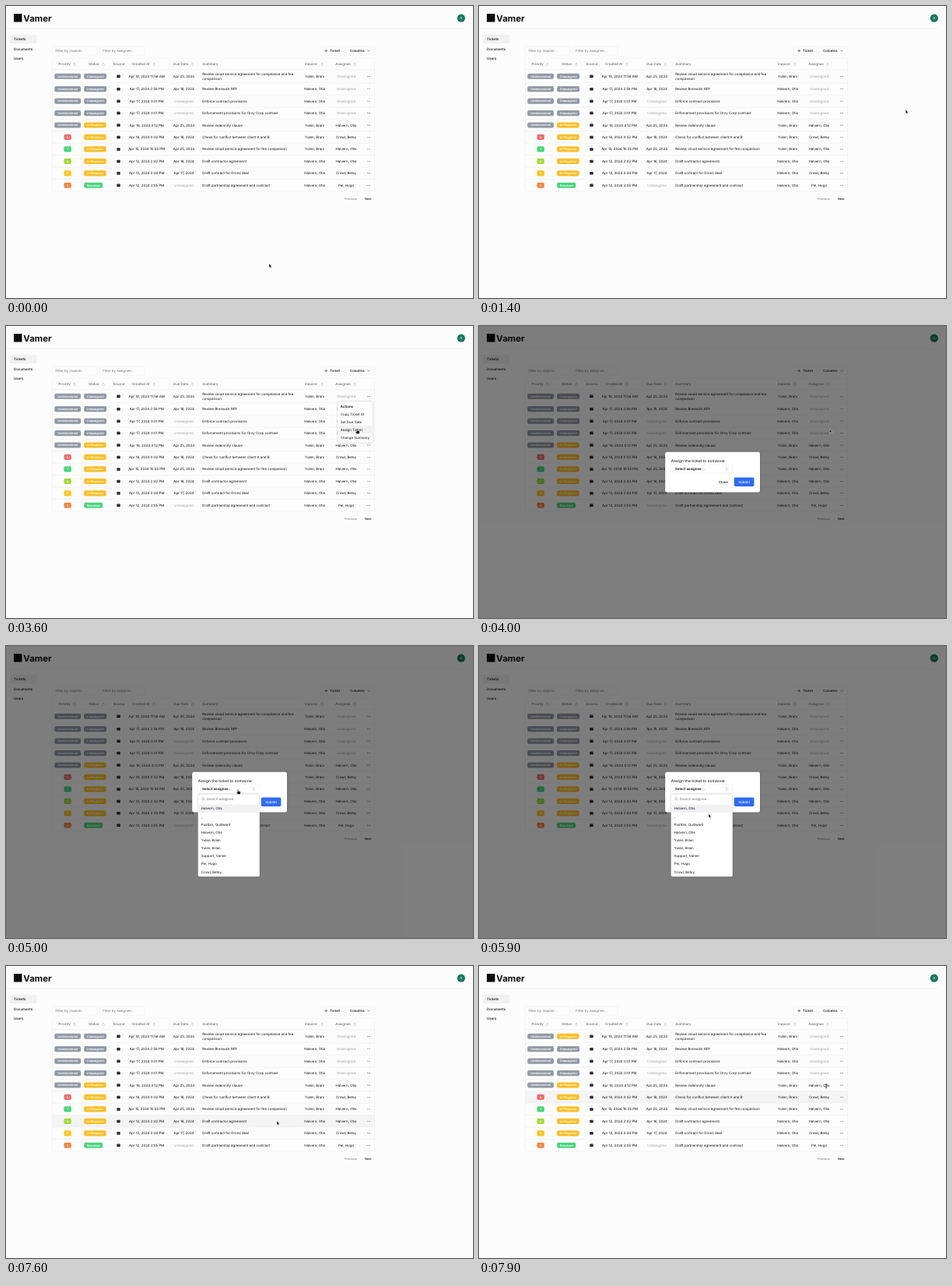
Recreate the animation shown at these times as an HTML page. Size 600 by 375 pixels, loop 8 s.

```html
<!DOCTYPE html>
<html lang="en">
<head>
<meta charset="utf-8">
<title>Tickets</title>
<style>
  html, body { margin: 0; width: 100%; height: 100%; overflow: hidden; background: #fcfcfc; }
  svg { display: block; width: 100%; height: 100%; }
  text { font-family: Inter, sans-serif; text-rendering: geometricPrecision; }
  .raised { filter: drop-shadow(0 .6px 1px #0003); }
</style>
</head>
<body>
<svg id="stage" viewBox="0 0 600 375"></svg>
<script>
const LOOP = 8000, STEP = 100;
const BODY = 4.42, SMALL = 3.79;
const INK = '#0c0c10', MUTED = '#71717a', PALE = '#a0a0a6', LINE = '#e6e6e9', ACCENT = '#f1f1f4';
const OTIS = 'Halvern, Otis', BRAM = 'Yulen, Bram', BETSY = 'Crowl, Betsy', HUGO = 'Pel, Hugo';
const NONE = 'Unassigned', PROGRESS = 'In Progress';

const PRIORITY = { Undetermined: '#9298a4', 5: '#f26b6b', 1: '#45d67c', 2: '#9fdc35', 3: '#f9c51c', 4: '#f3853f' };
const STATUS = { [NONE]: ['#9298a4', 29], [PROGRESS]: ['#fbbf24', 28.5], Resolved: ['#45d67c', 24] };

// priority, status, created, due, summary lines, inquirer, assignee
const TICKETS = [
  ['Undetermined', NONE, 'Apr 19, 2024 11:58 AM', 'Apr 25, 2024', 'Review cloud service agreement for compliance and fee|comparison', BRAM, NONE],
  ['Undetermined', NONE, 'Apr 17, 2024 2:58 PM', 'Apr 18, 2024', 'Review Brenwick RFP', OTIS, NONE],
  ['Undetermined', NONE, 'Apr 17, 2024 0:01 PM', NONE, 'Enforce contract provisions', OTIS, NONE],
  ['Undetermined', NONE, 'Apr 17, 2024 0:01 PM', NONE, 'Enforcement provisions for Orvy Corp contract', OTIS, NONE],
  ['Undetermined', PROGRESS, 'Apr 16, 2024 4:12 PM', 'Apr 25, 2024', 'Review indemnity clause', BRAM, OTIS],
  [5, PROGRESS, 'Apr 16, 2024 0:32 PM', 'Apr 18, 2024', 'Check for conflict between client A and B', BRAM, BETSY],
  [1, PROGRESS, 'Apr 15, 2024 10:35 PM', 'Apr 25, 2024', 'Review cloud service agreement for fee comparison', BRAM, OTIS],
  [2, PROGRESS, 'Apr 12, 2024 2:42 PM', 'Apr 16, 2024', 'Draft contractor agreement', OTIS, OTIS],
  [3, PROGRESS, 'Apr 12, 2024 2:34 PM', 'Apr 17, 2024', 'Draft contract for Dronz deal', OTIS, BETSY],
  [4, 'Resolved', 'Apr 12, 2024 2:05 PM', NONE, 'Draft partnership agreement and contract', OTIS, HUGO],
];
// label, x, x of the sort arrows
const COLUMNS = [['Priority', 67.5, 88], ['Status', 106, 125], ['Source', 137.5], ['Created At', 162, 190],
  ['Due Date', 215, 239.5], ['Summary', 252.3], ['Inquirer', 384, 406], ['Assignee', 423.3, 448]];
const ACTIONS = ['Copy Ticket ID', 'Set Due Date', 'Assign Ticket', 'Change Summary'];
const ASSIGNEES = [OTIS, ',', 'Postbin, Quillward', OTIS, BRAM, BRAM, 'Support, Vamer', HUGO, BETSY];

// Pointer path: time, x, y, shape from then on
const PATH = [
  [0, 338, 331, 'arrow'], [400, 338, 331, 'arrow'], [600, 362, 310, 'arrow'], [900, 462, 220, 'arrow'],
  [1100, 532, 160, 'arrow'], [1300, 556, 139, 'arrow'], [1400, 548, 133, 'arrow'], [1600, 508, 82, 'arrow'],
  [1700, 486, 61, 'arrow'], [1900, 470, 76, 'arrow'], [2200, 466, 89, 'hand'], [2900, 466, 89, 'hand'],
  [3100, 463, 104, 'hand'], [3400, 453, 128, 'hand'], [3600, 451, 132, 'hand'], [4000, 450.3, 132.5, 'arrow'],
  [4200, 410, 146, 'arrow'], [4500, 317, 178, 'hand'], [4700, 298, 184, 'hand'], [5000, 298, 184, 'hand'],
  [5200, 298, 192, 'ibeam'], [5600, 297, 198, 'ibeam'], [5800, 297, 198, 'ibeam'], [5900, 295, 215.5, 'arrow'],
  [6000, 293, 225.5, 'arrow'], [6200, 288, 220, 'arrow'], [6500, 281, 209, 'arrow'], [6600, 281, 209, 'arrow'],
  [6900, 305, 208, 'arrow'], [7200, 335, 203.5, 'hand'], [7400, 338.6, 202.5, 'hand'], [7500, 338.6, 202.5, 'hand'],
  [7600, 348, 199, 'arrow'], [7700, 378, 187, 'arrow'], [7800, 422, 168, 'arrow'], [7900, 446, 154, 'ibeam'],
];

function pointerAt(time) {
  const i = PATH.findLastIndex(key => key[0] <= time);
  const [t0, x0, y0, shape] = PATH[i];
  const [t1, x1, y1] = PATH[i + 1] || [LOOP, x0, y0];
  const k = (time - t0) / (t1 - t0);
  return { x: x0 + (x1 - x0) * k, y: y0 + (y1 - y0) * k, shape };
}

const inside = (p, x, y, w, h) => p.x >= x && p.x < x + w && p.y >= y && p.y < y + h;

// y is the vertical middle of the text
const text = (x, y, label, { size = BODY, weight = 400, fill = INK, anchor = 'start' } = {}) =>
  `<text x="${x}" y="${y + size * .36}" font-size="${size}" font-weight="${weight}" fill="${fill}" text-anchor="${anchor}">${label}</text>`;
const centred = (x, y, label, style) => text(x, y, label, { ...style, anchor: 'middle' });
const box = (x, y, w, h, fill, r = 0, stroke = 'none') =>
  `<rect x="${x}" y="${y}" width="${w}" height="${h}" rx="${r}" fill="${fill}" stroke="${stroke}" stroke-width=".35"/>`;
const stroke = (x, y, d, color = MUTED, width = .4) =>
  `<path transform="translate(${x} ${y})" d="${d}" fill="none" stroke="${color}" stroke-width="${width}" stroke-linecap="round"/>`;
const rule = (x, y, w) => stroke(x, y, `M0 0H${w}`, LINE, .4);
const sortArrows = (x, y) => stroke(x, y, 'M-1.1-.7 0-1.8 1.1-.7M-1.1 .7 0 1.8 1.1 .7');
const badge = (x, y, w, label, fill) =>
  box(x, y - 3.6, w, 7.2, fill, 2) + centred(x + w / 2, y, label, { size: SMALL, weight: 600, fill: '#fff' });
const cell = (x, y, label) => centred(x, y, label, { fill: label === NONE ? PALE : INK });

const ROW_TOP = 98.9, ROW_PITCH = 15.45;
const rowBox = i => i ? [ROW_TOP + (i - 1) * ROW_PITCH, ROW_PITCH] : [81.6, 17.3];

function ticketRow(ticket, i, hovered) {
  const [priority, status, created, due, summary, inquirer, assignee] = ticket;
  const [top, height] = rowBox(i), y = top + height / 2;
  const wide = priority === 'Undetermined' ? 33.8 : 9.4;
  const lines = summary.split('|');
  const [fill, width] = STATUS[status];
  return (hovered ? box(59.7, top, 413.8, height, '#f4f4f5') : '') + rule(59.5, top, 414)
    + badge(79.2 - wide / 2, y, wide, priority, PRIORITY[priority])
    + badge(100.2, y, width, status, fill)
    + box(142.4, y - 1.7, 4.3, 3.5, INK, .6) + stroke(144.55, y, 'M-1.6-.8 0 .2 1.6-.8', '#fff', .35)
    + cell(180.7, y, created) + cell(228.5, y, due)
    + lines.map((line, n) => text(252.3, y + (n - (lines.length - 1) / 2) * 6.3, line)).join('')
    + cell(396.6, y, inquirer) + cell(437, y, assignee)
    + [-1.6, 0, 1.6].map(dx => `<circle cx="${466 + dx}" cy="${y}" r=".42" fill="${INK}"/>`).join('');
}

function page(time) {
  const medium = { weight: 500 };
  const free = time < 2400 || time >= 7600;
  const trail = pointerAt(Math.max(0, time - STEP));   // row tint lags the pointer
  const rows = TICKETS.map((ticket, i) => {
    const [top, height] = rowBox(i);
    const current = i === 0 && time >= 7700 ? ticket.with(1, PROGRESS) : ticket;
    return ticketRow(current, i, free && inside(trail, 59.5, top, 414, height));
  });
  return box(10, 10, 10.5, 10.5, INK) + text(22.3, 15.6, 'Vamer', { size: 11.4, weight: 700 })
    + `<circle cx="584.8" cy="15.7" r="5.1" fill="#17795c"/>` + centred(584.8, 15.7, 'A', { fill: '#fff' })
    + rule(0, 29.2, 590)
    + box(5, 36.7, 34.5, 11.4, ACCENT, 1.8)
    + ['Tickets', 'Documents', 'Users'].map((label, i) => text(10, 42.3 + i * 12.65, label, medium)).join('')
    + box(59.6, 52, 57.6, 11.2, 'none', 1.8, LINE) + text(63.4, 57.6, 'Filter by inquirer...', { fill: MUTED })
    + box(120.6, 52, 57.6, 11.2, 'none', 1.8, LINE) + text(124.2, 57.6, 'Filter by assignee...', { fill: MUTED })
    + box(404.3, 52, 29, 11.2, 'none', 1.8, LINE) + stroke(411.2, 57.6, 'M-1.6 0H1.6M0-1.6V1.6', INK, .5)
    + text(416, 57.6, 'Ticket', medium)
    + box(437, 52, 36.5, 11.2, 'none', 1.8, LINE) + text(442, 57.6, 'Columns', medium)
    + stroke(466, 57.4, 'M-1.5-.6 0 .9 1.5-.6', INK)
    + COLUMNS.map(([label, x, sort]) => text(x, 74.8, label, { weight: 500, fill: MUTED })
      + (sort ? sortArrows(sort, 74.8) : '')).join('')
    + rows.join('') + box(59.5, 67.1, 414, 170.9, 'none', 1.8, LINE)
    + text(434.9, 248, 'Previous', { size: SMALL, weight: 500, fill: '#85858b' })
    + text(461, 248, 'Next', { size: SMALL, weight: 500 });
}

function actionMenu(pointer, opacity) {
  const active = Math.round((pointer.y + 1 - 113.1) / 10.15);
  return `<g opacity="${opacity}"><g class="raised">${box(426.3, 97, 44.7, 53, '#fff', 1.8, LINE)}</g>`
    + text(429.8, 103, 'Actions', { weight: 600 })
    + ACTIONS.map((label, i) => (i === active ? box(427.6, 108 + i * 10.15, 42.1, 10.15, ACCENT, 1.2) : '')
      + text(429.8, 113.1 + i * 10.15, label)).join('') + '</g>';
}

function assigneeList(pointer) {
  const over = Math.round((pointer.y - 208.8) / 10.15);
  const active = over < 2 ? 0 : over;
  return `<g class="raised">${box(246.8, 190.5, 79, 105.6, '#fff', 1.8, LINE)}</g>`
    + `<circle cx="253" cy="196.2" r="1.4" fill="none" stroke="${MUTED}" stroke-width=".4"/>`
    + stroke(254, 197.2, 'M0 0 .9 .9') + text(257.8, 196.6, 'Search assignee...', { fill: MUTED })
    + rule(247, 203, 78.6)
    + ASSIGNEES.map((name, i) => (i === active ? box(247.8, 203.9 + i * 10.15, 77, 9.8, ACCENT, 1.2) : '')
      + text(250.7, 208.8 + i * 10.15, name)).join('');
}

function dialog(time, pointer) {
  const listOpen = time >= 5000 && time < 6700;
  const submitHot = !listOpen && inside(pointer, 328, 194.5, 25.5, 11.5);
  return box(0, 0, 600, 375, '#00000080')
    + `<g class="raised">${box(239.2, 161.8, 121.8, 51.8, '#fff', 2.5)}</g>`
    + text(246.8, 172.8, 'Assign the ticket to someone', { size: 5.05 })
    + box(246.8, 178, 79, 11.2, '#fff', 1.8, LINE)
    + text(252, 183.6, time < 6700 ? 'Select assignee...' : OTIS, { weight: 600 })
    + sortArrows(318.3, 183.6)
    + text(307.8, 200.2, 'Close', { weight: 500 })
    + box(327.8, 194.4, 25.6, 11.6, submitHot ? '#2a2cc0' : '#2f6bf0', 1.8)
    + centred(340.6, 200.2, 'Submit', { weight: 500, fill: '#fff' })
    + (listOpen ? assigneeList(pointer) : '');
}

const SHAPES = {
  arrow: '<path d="M0 0V5L1.2 4 2 5.9 2.9 5.5 2.1 3.7H3.6Z" fill="#000" stroke="#fff" stroke-width=".45"/>',
  hand: '<path d="M-.6 .4Q0-.5 .6 .4V2.4L2.9 2.9Q3.5 3.2 3.3 4.2L2.7 6.4H-.2L-2.2 4Q-2.1 3.2-1.3 3.5L-.6 4Z" fill="#000" stroke="#fff" stroke-width=".5"/>',
  ibeam: '<path d="M-1.1-2.6Q0-2.6 0-2 0-2.6 1.1-2.6M0-2V2M-1.1 2.6Q0 2.6 0 2 0 2.6 1.1 2.6M-.6 .8H.6" fill="none" stroke="#000" stroke-width=".55"/>',
};

function scene(time) {
  const pointer = pointerAt(time);
  return page(time)
    + (time >= 2400 && time < 4000 ? actionMenu(pointer, time < 2500 ? .6 : 1) : '')
    + (time >= 4000 && time < 7600 ? dialog(time, pointer) : '')
    + `<g transform="translate(${pointer.x} ${pointer.y})">${SHAPES[pointer.shape]}</g>`;
}

const stage = document.getElementById('stage');
let shown = -1;
function tick() {
  const time = Math.floor(performance.now() % LOOP / STEP) * STEP;
  if (time !== shown) stage.innerHTML = scene(shown = time);
  requestAnimationFrame(tick);
}
tick();
</script>
</body>
</html>
```
